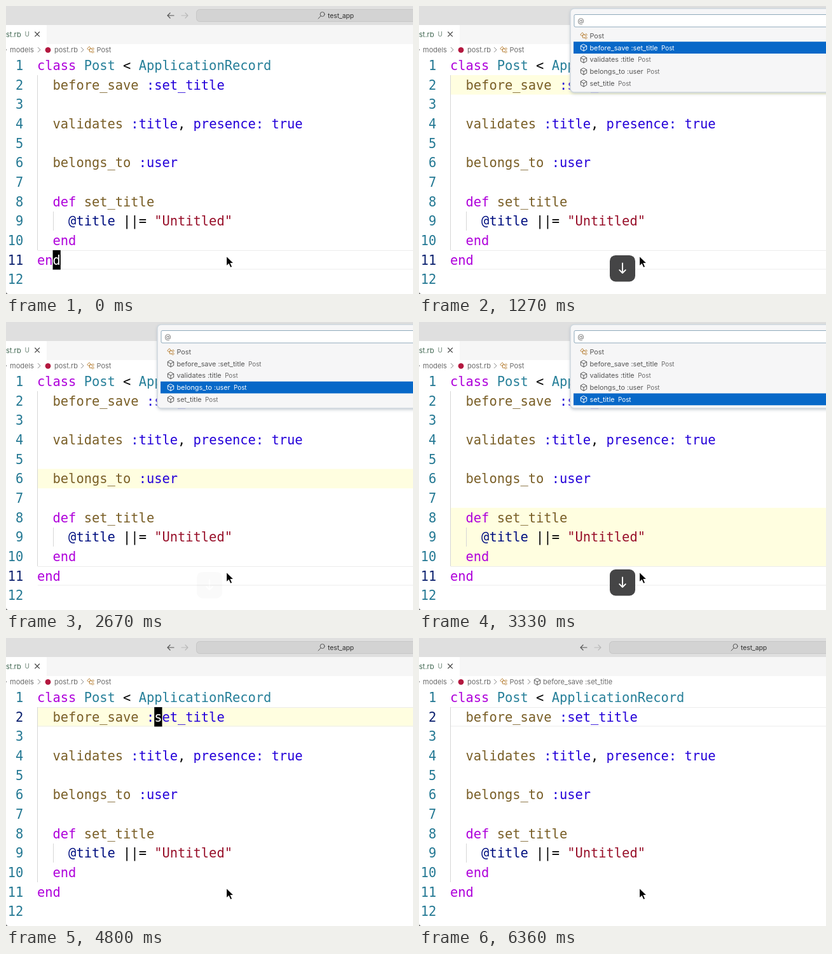
Animation of 640x454 px, one loop 6.45 s. Source, as an HTML page:

```html
<!DOCTYPE html>
<html lang="en">
<head>
<meta charset="utf-8">
<title>Go to symbol</title>
<style>
  html, body { margin: 0; width: 100%; height: 100%; overflow: hidden; background: #fff; }
  svg { display: block; width: 640px; height: 454px; }
  text { white-space: pre; }
  .code { font: 20.4px "DejaVu Sans Mono", Menlo, monospace; }
  .ui { font: 11px Inter, "Liberation Sans", sans-serif; fill: #6b6b6b; }
  .line { fill: none; stroke: currentColor; stroke-linecap: round; stroke-linejoin: round; }
</style>
</head>
<body>
<svg id="stage" viewBox="0 0 640 454">
  <defs>
    <g id="cube" class="line"><path d="M0-5.2L4.7-2.7V2.7L0 5.2L-4.7 2.7V-2.7ZM-4.7-2.7L0 0L4.7-2.7M0 0V5.2"/></g>
    <g id="class" class="line"><path d="M-5-2.2L-2-5L.3-2.7L-2.7.3ZM-.8-1.5H2M-1.6-1.5V3.2H2M2-1.5L3.7-3.2L5.4-1.5L3.7.2ZM2 3.2L3.7 1.5L5.4 3.2L3.7 4.9Z"/></g>
    <path id="chevron" class="line" d="M-1.7-3.6L1.9 0L-1.7 3.6"/>
    <path id="back" class="line" d="M5 0H-5M-1-4L-5 0L-1 4"/>
    <filter id="soft" x="-10%" y="-10%" width="120%" height="130%"><feGaussianBlur stdDeviation="2.5"/></filter>
  </defs>
  <rect width="640" height="454" fill="#fff"/>

  <g id="titlebar">
    <rect width="640" height="30" fill="#dfdfdf"/>
    <use href="#back" x="259" y="15" color="#555" stroke-width="1.2"/>
    <use href="#back" transform="translate(281 15) scale(-1 1)" color="#b9b9b9" stroke-width="1.2"/>
    <rect x="299.5" y="5.5" width="360" height="19" rx="5" fill="#d3d3d3" stroke="#c6c6c6"/>
    <g class="line" color="#555"><circle cx="497.5" cy="13" r="3.5"/><path d="M495 15.7L491 20"/></g>
    <text class="ui" x="506" y="18.8" style="font-size:10.3px;fill:#2d2d2d">test_app</text>
  </g>

  <g id="tabs">
    <rect x="64" y="30" width="576" height="30" fill="#f6f6f6"/>
    <text class="ui" x="0" y="48.5" style="fill:#3f6650">st.rb</text>
    <text class="ui" x="29.5" y="48.3" style="font-size:10px;fill:#6d8577">U</text>
    <path class="line" color="#444" stroke-width="1.2" d="M45.7 41L52.5 47.8M52.5 41L45.7 47.8"/>
  </g>

  <g id="crumbs" class="ui">
    <use href="#chevron" x="-1" y="69" color="#888"/>
    <text x="6" y="73">models</text>
    <use href="#chevron" x="52" y="69" color="#888"/>
    <circle cx="66" cy="69.3" r="4.4" fill="#b3183f"/>
    <text x="76" y="73">post.rb</text>
    <use href="#chevron" x="120" y="69" color="#888"/>
    <use href="#class" x="133" y="69" color="#b98238"/>
    <text x="142.5" y="73">Post</text>
    <g id="method">
      <use href="#chevron" x="173" y="69" color="#888"/>
      <use href="#cube" x="186" y="69" color="#555"/>
      <text x="195" y="73">before_save :set_title</text>
    </g>
  </g>

  <g id="editor">
    <rect id="range" x="50" width="590" fill="#fffee0"/>
    <path id="current" fill="none" stroke="#ececec"/>
    <path d="M49.5 109V385M74.5 324V354" stroke="#d6d6d6"/>
  </g>
  <path d="M0 450Q0 454 4 454H0Z" fill="#555"/>

  <g id="palette">
    <rect x="238" y="6" width="420" height="132" rx="6" fill="#8d9aa6" opacity=".55" filter="url(#soft)"/>
    <rect x="238" y="4" width="420" height="132" rx="6" fill="#f6f6f7" stroke="#cfd8df" stroke-width="1.5"/>
    <rect x="244" y="13.5" width="420" height="19.5" rx="2" fill="#fff" stroke="#8fa9bb"/>
    <text class="ui" x="249.5" y="27" style="font-size:10.5px">@</text>
    <rect id="selected" x="243" width="400" height="18.75" fill="#0768c8"/>
  </g>

  <path id="pointer" transform="translate(346.5 394)" d="M0 0V16.2L3.8 12.8L6.3 18.6L9.3 17.3L6.8 11.6H11.8Z" fill="#000" stroke="#fff" stroke-width="1.2"/>

  <g id="badge">
    <rect id="plate" y="0" height="41.5" rx="9" fill="#3b3b3d" opacity=".95"/>
    <g class="line" color="#fff" stroke-width="1.9">
      <g id="chord">
        <path d="M287 17.5H293.5V24H287ZM287 17.5H284.3A2.8 2.8 0 1 1 287 14.7ZM293.5 17.5V14.7A2.8 2.8 0 1 1 296.3 17.5ZM293.5 24H296.3A2.8 2.8 0 1 1 293.5 26.8ZM287 24V26.8A2.8 2.8 0 1 1 284.3 24Z"/>
        <path d="M321.5 11.5L331 21H326V29H317V21H312Z"/>
        <text class="ui" x="351.3" y="28.8" text-anchor="middle" stroke="none" style="font-size:22.5px;fill:#fff">O</text>
      </g>
      <path id="arrow" d="M320 12.5V28M315.2 23.2L320 28L324.8 23.2"/>
      <path id="enter" d="M327 14V21.5H313.5M317.5 17.5L313.5 21.5L317.5 25.5"/>
    </g>
  </g>
</svg>
<script>
const LOOP = 6450, OPEN = 340, CLOSE = 4270;
const LEFT = 49, CHAR = 12.28, ROW = 30.66, TOP = 78.3;
const INK = { k: "#af00db", t: "#267f99", f: "#795e26", b: "#2400d9", v: "#001080", s: "#98102a", o: "#000" };

// Each token: colour key, column, text.
const CODE = [
  [["k", 0, "class"], ["t", 6, "Post"], ["o", 11, "<"], ["t", 13, "ApplicationRecord"]],
  [["f", 2, "before_save"], ["b", 14, ":set_title"]],
  [],
  [["f", 2, "validates"], ["b", 12, ":title"], ["o", 18, ","], ["b", 20, "presence:"], ["b", 30, "true"]],
  [],
  [["f", 2, "belongs_to"], ["b", 13, ":user"]],
  [],
  [["k", 2, "def"], ["f", 6, "set_title"]],
  [["v", 4, "@title"], ["o", 11, "||="], ["s", 15, '"Untitled"']],
  [["k", 2, "end"]],
  [["k", 0, "end"]],
  []
];
const SYMBOLS = ["Post", "before_save :set_title", "validates :title", "belongs_to :user", "set_title"];
const RANGES = [[1, 10], [2, 2], [4, 4], [6, 6], [8, 10]];

// Key presses: time, key, selected row.
const KEYS = [
  [OPEN, "chord", 0], [1200, "down", 1], [2070, "down", 2], [2670, "down", 3], [3000, "down", 4],
  [3530, "up", 3], [3770, "up", 2], [4000, "up", 1], [CLOSE, "enter", 1]
];

const $ = id => document.getElementById(id);
const rowTop = n => TOP + ROW * (n - 1);

function add(parent, tag, attrs, text = "") {
  const el = document.createElementNS("http://www.w3.org/2000/svg", tag);
  for (const key in attrs) el.setAttribute(key, attrs[key]);
  el.textContent = text;
  return parent.appendChild(el);
}
const set = (id, attrs) => { for (const key in attrs) $(id).setAttribute(key, attrs[key]); };
const show = (id, on) => { $(id).style.display = on ? "" : "none"; };
const codeText = (x, n, fill, text, anchor = "start") =>
  add($("editor"), "text", { class: "code", x, y: rowTop(n) + 22.7, fill, "text-anchor": anchor }, text);

const numbers = CODE.map((tokens, i) => {
  for (const [ink, col, text] of tokens) codeText(LEFT + col * CHAR, i + 1, INK[ink], text);
  return codeText(27.3, i + 1, "#237893", String(i + 1), "end");
});
const block = add($("editor"), "rect", { width: CHAR, height: ROW, fill: "#000" });
const blockText = codeText(0, 1, "#fff", "");

const items = SYMBOLS.map((name, i) => {
  const y = 46.9 + i * 18.75;
  const icon = add($("palette"), "use", { href: i ? "#cube" : "#class", x: 259, y });
  const label = add($("palette"), "text", { class: "ui", x: 268.5, y: y + 3.9, style: "font-size:10.8px" }, name);
  const detail = i && add(label, "tspan", { dx: 5.5, style: "font-size:9.8px" }, "Post");
  return { icon, label, detail, i };
});

function drawBadge(t, press) {
  const age = press ? t - press[0] : LOOP;
  const hold = press && press[1] === "enter" ? 320 : 600;
  const alpha = Math.min(1, age / 40, 1 - (age - hold) / 130);
  show("badge", alpha > 0);
  if (alpha <= 0) return;
  const key = press[1], wide = key === "chord";
  const y = 394 - 4 * Math.min(1, age / 280);
  set("badge", { transform: `translate(0 ${y})`, opacity: alpha });
  set("plate", { x: wide ? 268 : 300, width: wide ? 104 : 40 });
  show("chord", wide);
  show("enter", key === "enter");
  show("arrow", key === "down" || key === "up");
  set("arrow", { transform: key === "up" ? "rotate(180 320 20.5)" : "" });
}

function draw(t) {
  const press = KEYS.filter(k => k[0] <= t).pop();
  const open = t >= OPEN && t < CLOSE, done = t >= CLOSE;
  const pick = press ? press[2] : 0;
  const line = done ? 2 : 11;

  show("palette", open);
  show("method", t >= 5000);
  set("selected", { y: 37.5 + pick * 18.75 });
  for (const { icon, label, detail, i } of items) {
    const on = i === pick;
    icon.setAttribute("color", on ? "#fff" : i ? "#555" : "#b98238");
    label.style.fill = on ? "#fff" : "#555";
    if (detail) detail.style.fill = on ? "#fff" : "#6b6b6b";
  }

  const [from, to] = RANGES[pick];
  show("range", open || (done && t < 5700));
  set("range", { y: rowTop(from), height: ROW * (to - from + 1) });
  const y = rowTop(line);
  set("current", { d: `M50 ${y + .6}H640M50 ${y + ROW - .6}H640` });
  numbers.forEach((el, i) => el.setAttribute("fill", i + 1 === line ? "#0b216f" : "#237893"));

  const col = done ? 15 : 2, x = LEFT + col * CHAR;
  const lit = t < OPEN || (done && (t - CLOSE) % 1060 < 560);
  block.style.display = blockText.style.display = lit ? "" : "none";
  block.setAttribute("x", x);
  block.setAttribute("y", y);
  blockText.setAttribute("x", x);
  blockText.setAttribute("y", y + 22.7);
  blockText.textContent = done ? "s" : "d";

  drawBadge(t, press);
}

const start = performance.now();
function tick() {
  draw((performance.now() - start) % LOOP);
  requestAnimationFrame(tick);
}
tick();
</script>
</body>
</html>
```
